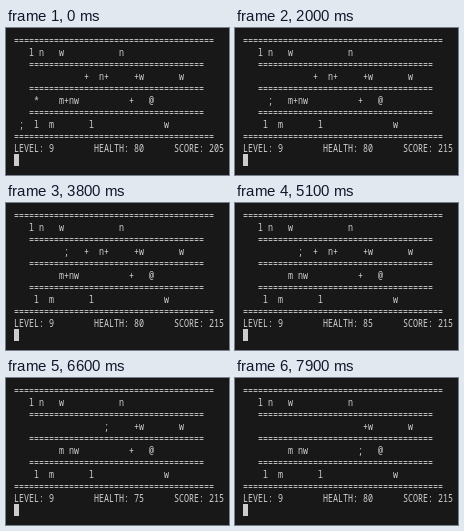
An HTML page for the animation above (8000 ms loop, 223 by 147 pixels).

```html
<!DOCTYPE html>
<html lang="en">
<head>
<meta charset="utf-8">
<title>Terminal platform game</title>
<style>
  html, body { margin: 0; width: 100%; height: 100%; overflow: hidden; background: #181818; }
  /* the terminal uses narrow cells: 5 by 12 px */
  #screen {
    position: absolute; left: 8px; top: 6px; margin: 0;
    font: 11px/12px "Noto Sans Mono", "DejaVu Sans Mono", monospace;
    font-variant-ligatures: none;
    color: #d0d0d0; white-space: pre;
    transform: scaleX(.7576); transform-origin: 0 0;
  }
  #cursor { position: absolute; left: 8px; top: 126px; width: 5px; height: 12px; background: #cccccc; }
</style>
</head>
<body>
<pre id="screen"></pre>
<div id="cursor"></div>
<script>
const LOOP = 8000;
const wall = '='.repeat(40);
const floor = '   ' + '='.repeat(35);
const level = [
  wall,
  '   l n   w           n',
  floor,
  '              +  n+     +w       w',
  floor,
  '    *    m+nw          +   @',
  floor,
  '    l  m       l              w',
  wall
];

// time, row, column of the player
const moves = [
  [0, 7, 1], [1000, 7, 2], [1200, 7, 3], [1500, 5, 3], [1700, 5, 4],
  [2000, 5, 5], [2400, 5, 6], [2600, 5, 7], [3000, 5, 8],
  [3200, 3, 8], [3400, 3, 9], [3800, 3, 10], [4600, 5, 10],
  [5000, 3, 10], [5100, 3, 11], [5600, 3, 14], [5700, 3, 16],
  [6300, 3, 17], [6600, 3, 18], [7100, 5, 18], [7300, 5, 19],
  [7800, 5, 21], [7900, 5, 23]
];
const healthGain = { '+': 5, 'n': -20 };
const scoreGain = { '*': 10 };

const screen = document.getElementById('screen');
let shown = '';

function render(t) {
  const grid = level.map(line => [...line.padEnd(40)]);
  let health = 80, score = 205, row, col;
  for (const [at, r, c] of moves) {
    if (at > t) break;
    const item = grid[r][c];
    health += healthGain[item] || 0;
    score += scoreGain[item] || 0;
    grid[r][c] = ' ';
    row = r;
    col = c;
  }
  grid[row][col] = ';';
  const status = 'LEVEL: 9'.padEnd(16) + ('HEALTH: ' + health).padEnd(16) + 'SCORE: ' + score;
  return grid.map(cells => cells.join('')).join('\n') + '\n' + status;
}

const start = performance.now();
function tick() {
  const text = render((performance.now() - start) % LOOP);
  if (text !== shown) screen.textContent = shown = text;
  requestAnimationFrame(tick);
}
tick();
</script>
</body>
</html>
```
